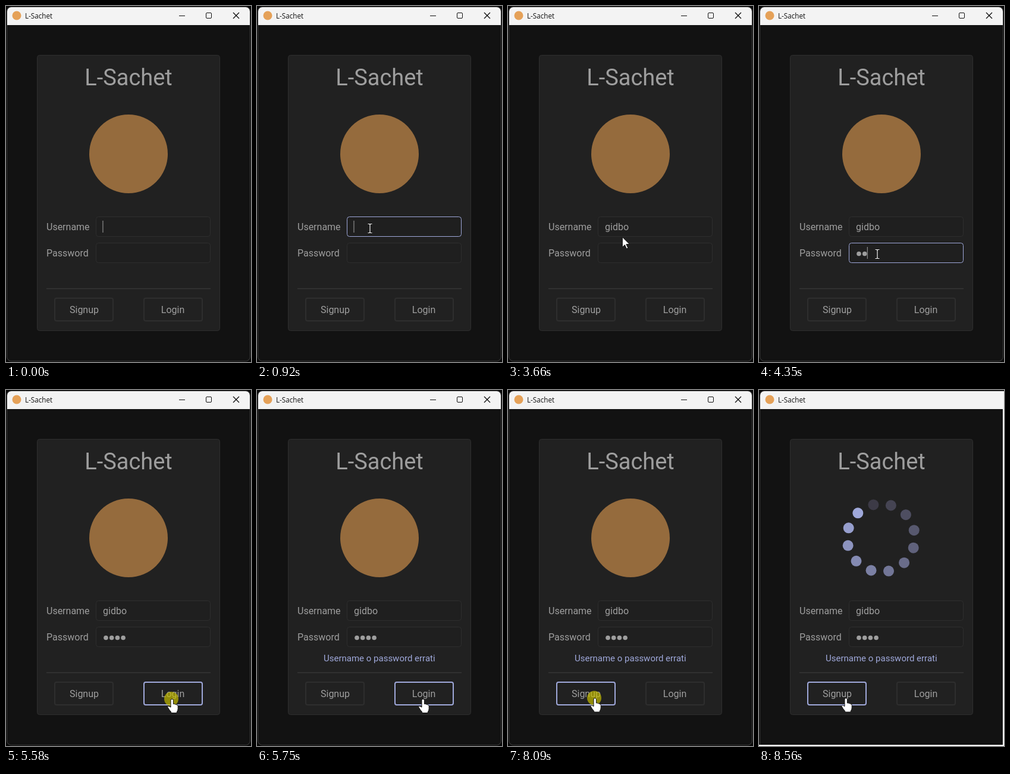
Animation of 412 by 597 pixels, one loop 8630 ms. Source, as an HTML page:

```html
<!DOCTYPE html>
<html lang="it">
<head>
<meta charset="utf-8">
<title>L-Sachet</title>
<style>
  html, body { margin: 0; width: 100%; height: 100%; overflow: hidden; background: #080808; }
  svg { display: block; width: 100%; height: 100%; }
  text { font: 16px Roboto, sans-serif; fill: #9e9e9e; }
  .title { font-size: 38px; }
  .caption { font: 11.7px "Open Sans", sans-serif; fill: #111; }
  .error { font-size: 15px; fill: #9fa8da; }
  .mid { text-anchor: middle; }
  .control { fill: #212121; stroke: #2e2e2e; }
  .field { fill: #1f1f1f; }
  .button { stroke-width: 2; }
  .control.hover { stroke: #9fa8da; }
  .icons { fill: none; stroke: #111; }
  .dots { fill: #9e9e9e; }
  .cursor { fill: #fff; stroke: #111; stroke-linejoin: round; }
</style>
</head>
<body>
<svg viewBox="0 0 412 597" preserveAspectRatio="none">
  <defs>
    <clipPath id="frame"><rect id="frameShape" x="2" y="2" width="408" height="593" rx="7"/></clipPath>
  </defs>
  <rect id="outline" x="1" y="1" width="410" height="595" rx="8" fill="#3a3a3a"/>
  <g clip-path="url(#frame)">
    <rect width="412" height="597" fill="#121212"/>
    <rect width="412" height="32" fill="#f3f3f3"/>
  </g>
  <path id="edge" d="M411 32V596H0" fill="none" stroke="#fff" stroke-width="2"/>
  <circle cx="18" cy="16" r="7.5" fill="#e5a158"/>
  <text class="caption" x="32" y="21">L-Sachet</text>
  <g id="windowIcons" class="icons">
    <path d="M291 16.5h10"/>
    <path d="M382 11l10 10m0-10l-10 10" stroke-width="1.4"/>
    <rect x="336.5" y="11.5" width="9" height="9" rx="1.5"/>
  </g>

  <rect x="52.5" y="82.5" width="307" height="462" rx="4" fill="#212121" stroke="#2e2e2e"/>
  <text class="title mid" x="206" y="133">L-Sachet</text>
  <circle id="coin" cx="206" cy="248" r="66" fill="#956b3d"/>
  <g id="spinner"></g>

  <text x="68" y="376">Username</text>
  <text x="68" y="420">Password</text>
  <rect class="control field" x="151.5" y="353.5" width="192" height="33" rx="4"/>
  <rect class="control field" x="151.5" y="397.5" width="192" height="33" rx="4"/>
  <text id="user" x="163" y="376"></text>
  <g id="dots" class="dots"></g>
  <rect id="caret" width="1.3" height="20" fill="#858585"/>
  <text id="error" class="error" x="112" y="455">Username o password errati</text>

  <rect x="68" y="473" width="276" height="2" fill="#303030"/>
  <rect class="control button" x="82" y="490" width="98" height="38" rx="3"/>
  <rect class="control button" x="232" y="490" width="98" height="38" rx="3"/>
  <text class="mid" x="131.5" y="515">Signup</text>
  <text class="mid" x="280.5" y="515">Login</text>

  <g id="pointer">
    <circle id="press" r="12" fill="#c9c000" fill-opacity=".68"/>
    <path id="arrow" class="cursor" d="M0 0V17l4-4 3 6.500 2.500-1.200-3-6.300H12z"/>
    <g id="beam" fill="none">
      <path d="M-3.500-7.500h2.500l1 1 1-1h2.500M0-6.500v13M-3.500 7.500h2.500l1-1 1 1h2.500" stroke="#111" stroke-width="3"/>
      <path d="M-3.500-7.500h2.500l1 1 1-1h2.500M0-6.500v13M-3.500 7.500h2.500l1-1 1 1h2.500" stroke="#fff" stroke-width="1.200"/>
    </g>
    <path id="hand" class="cursor" d="M-1 2.500q0-2.300 2.200-2.300t2.200 2.300v6q2.200-.8 3 .8 1.600-.8 2.600.7 2-.2 2.200 2v4.500q0 3-2 5.500v1.500h-9.500v-1.500q-3.300-3.500-6-8.500 1.500-2.600 5.300.6z"/>
  </g>
</svg>
<script>
const LOOP = 8630;
const USER = 'gidbo';
const USER_KEYS = [2080, 2160, 2550, 2700, 2870];
const PASSWORD_KEYS = [4110, 4350, 4580, 4820];
const CARET_GAPS = [[1380, 1850], [3340, 3880]];
const PRESSES = [[830, 920], [3880, 3960], [5580, 5750], [8090, 8560]];
const PASSWORD_FOCUS = 3880, LOGIN_PRESS = 5580, ERROR_AT = 5750, LOADING_AT = 8560;

// Each move bends from the previous resting point through "via" to "to",
// in even steps that end at "until".
const MOVES = [
  { at: 210, until: 680, steps: 7, from: [375, 450], via: [270, 375], to: [190, 373] },
  { at: 3580, until: 3960, steps: 6, from: [190, 373], via: [193, 395], to: [199, 416] },
  { at: 4970, until: 5430, steps: 7, from: [199, 416], via: [240, 560], to: [278, 518] },
  { at: 6690, until: 6990, steps: 5, from: [278, 518], via: [205, 514], to: [145, 516.5] },
];

const $ = id => document.getElementById(id);
const controls = [...document.querySelectorAll('.control')];
const show = (id, on) => { $(id).style.display = on ? '' : 'none'; };
const setAttrs = (el, attrs) => { for (const k in attrs) el.setAttribute(k, attrs[k]); };
const within = (t, spans) => spans.some(([a, b]) => t >= a && t < b);
const typed = (t, keys) => keys.filter(k => t >= k).length;
const mix = (a, b, u) => a + (b - a) * u;

function addCircle(parent, cx, cy, r, fill) {
  const circle = document.createElementNS('http://www.w3.org/2000/svg', 'circle');
  setAttrs(circle, { cx, cy, r });
  if (fill) circle.setAttribute('fill', fill);
  $(parent).append(circle);
}

for (let i = 0; i < 12; i++) {
  const angle = (i * 30 - 103) * Math.PI / 180, u = i / 11;
  const rgb = [[60, 58, 70], [159, 168, 218]];
  const color = rgb[0].map((c, k) => Math.round(mix(c, rgb[1][k], u)));
  addCircle('spinner', 205.2 + 57 * Math.cos(angle), 248 + 57 * Math.sin(angle), 9, `rgb(${color})`);
}
PASSWORD_KEYS.forEach((_, i) => addCircle('dots', 168 + 9.7 * i, 415.5, 3.8));

function pointerAt(t) {
  const move = MOVES.filter(m => t >= m.at).pop();
  if (!move) return null;
  const { at, until, steps, from, via, to } = move;
  const step = Math.floor((t - at) / (until - at) * (steps - 1) + 1e-6) + 1;
  const u = Math.min(1, step / steps);
  return to.map((end, k) => mix(mix(from[k], via[k], u), mix(via[k], end, u), u));
}

function hit(el, [x, y]) {
  const { x: bx, y: by, width, height } = el.getBBox();
  return x >= bx && x <= bx + width && y >= by && y <= by + height;
}

function drawPointer(t) {
  const point = pointerAt(t);
  show('pointer', point);
  const target = point && controls.find(el => hit(el, point));
  controls.forEach(el => el.classList.toggle('hover', el === target));
  if (!point) return;
  const kind = !target ? 'arrow' : target.classList.contains('field') ? 'beam' : 'hand';
  ['arrow', 'beam', 'hand'].forEach(id => show(id, id === kind));
  show('press', within(t, PRESSES));
  $('pointer').setAttribute('transform', `translate(${point})`);
}

function drawForm(t) {
  const count = typed(t, PASSWORD_KEYS);
  $('user').textContent = USER.slice(0, typed(t, USER_KEYS));
  [...$('dots').children].forEach((dot, i) => { dot.style.display = i < count ? '' : 'none'; });
  const inPassword = t >= PASSWORD_FOCUS;
  const length = inPassword ? 9.7 * count : $('user').getComputedTextLength();
  setAttrs($('caret'), { x: 162.3 + length, y: inPassword ? 404 : 360 });
  show('caret', t < LOGIN_PRESS && !within(t, CARET_GAPS));
  show('error', t >= ERROR_AT);
}

function drawWindow(t) {
  const loading = t >= LOADING_AT;
  show('coin', !loading);
  show('spinner', loading);
  show('windowIcons', !loading);
  show('edge', loading);
  const extra = loading ? 30 : 0;
  setAttrs($('outline'), { width: 410 + extra, height: 595 + extra });
  setAttrs($('frameShape'), { width: 408 + extra, height: 593 + extra });
}

function render() {
  const t = performance.now() % LOOP;
  drawWindow(t);
  drawForm(t);
  drawPointer(t);
  requestAnimationFrame(render);
}
render();
</script>
</body>
</html>
```
